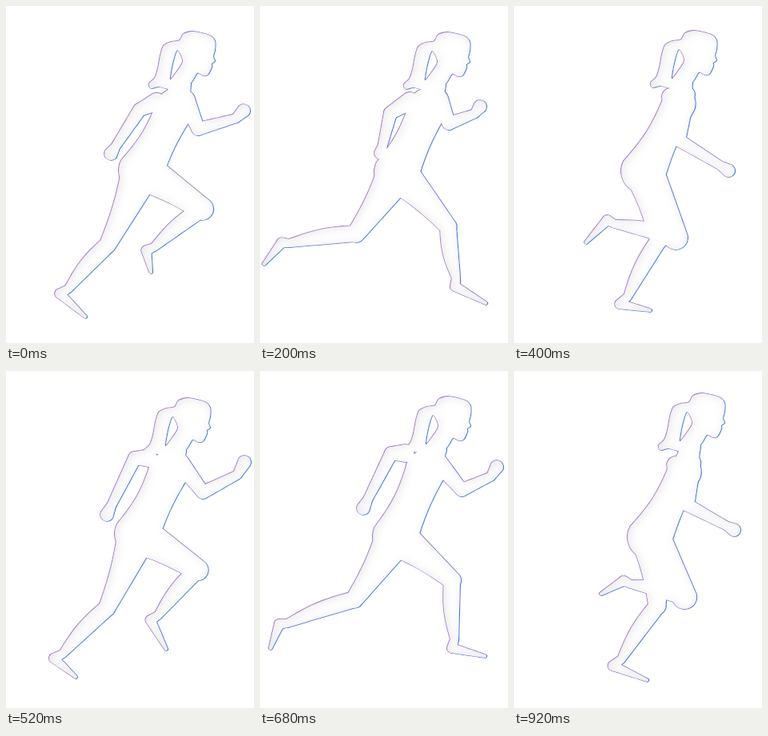
An HTML page with a canvas that plays this animation: 310 by 422 pixels, repeating every 1000 ms.

```html
<!DOCTYPE html>
<html lang="en">
<head>
<meta charset="utf-8">
<title>Runner</title>
<style>
html, body { margin: 0; width: 100%; height: 100%; overflow: hidden; background: #fff; }
canvas { display: block; }
</style>
</head>
<body>
<canvas id="stage" width="310" height="422"></canvas>
<script>
const W = 310, H = 422, LOOP = 1000;
const ctx = document.getElementById('stage').getContext('2d');
const shade = Object.assign(document.createElement('canvas'), { width: W, height: H });
const sctx = shade.getContext('2d');

// Moments at which the picture changes
const STEPS = [0, 80, 160, 200, 280, 360, 400, 480, 520, 600, 680, 720, 800, 880, 920];

const points = s => s.split(' ').map(p => p.split(',').map(Number));
const shift = (pts, dx, dy) => pts.map(([x, y]) => [x + dx, y + dy]);
const mix = (a, b, k) => Array.isArray(a) ? a.map((v, i) => mix(v, b[i], k)) : a + (b - a) * k;

// Head with ponytail, drawn once and carried along
const HEAD = points('222,35 217,43 206,45 197,50 193,62 190,78 186,90 179,97 181,103 191,101 203,104 220,104 232,95 239,84 246,87 252,86 257,76 257,72 261,69 259,63 261,55 261,44 255,37 235,32');
const HAIR_GAP = points('214,55 221,69 213,83 205,92 208,72');

// Joints: head shift, chest, hip, back elbow and hand, front elbow and hand,
// then knee, ankle and toe of each leg
const pose = (t, joints) => ({ t, joints: points(joints) });
const POSES = [
  pose(0, '0,0 211,128 169,206 167,130 131,185 240,154 297,131 127,299 78,354 99,389 245,254 185,302 181,333'),
  pose(200, '1,1 210,127 171,208 163,134 151,184 236,147 275,126 120,285 37,297 5,323 235,276 245,341 282,372'),
  pose(400, '-8,-1 206,122 162,207 196,145 185,165 206,168 268,206 202,290 126,273 90,296 181,293 142,364 170,381'),
  pose(520, '-6,2 203,126 164,204 161,109 126,180 246,152 298,114 239,249 190,306 200,348 126,297 71,354 87,383'),
  pose(680, '2,0 207,124 169,207 164,103 129,172 252,149 296,120 240,262 243,336 281,357 118,286 34,316 13,347'),
  pose(800, '5,-4 211,132 172,207 170,150 176,171 225,162 256,224 217,286 211,365 249,387 154,290 84,265 40,269'),
  pose(920, '2,-4 213,126 170,208 203,148 193,168 217,168 275,199 179,294 134,361 166,387 213,283 146,267 109,279')
];

// The landing repeats half a stride earlier with the legs exchanged
const landing = shift(POSES[5].joints, -5, 2);
POSES.splice(2, 0, { t: 300, joints: [...landing.slice(0, 7), ...landing.slice(10), ...landing.slice(7, 10)] });
POSES.push({ ...POSES[0], t: LOOP });

function jointsAt(t) {
  const i = POSES.findIndex(p => p.t > t), a = POSES[i - 1], b = POSES[i];
  return mix(a.joints, b.joints, (t - a.t) / (b.t - a.t));
}

// Unit vector from a to b
function toward(a, b) {
  const dx = b[0] - a[0], dy = b[1] - a[1], d = Math.hypot(dx, dy) || 1;
  return [dx / d, dy / d];
}

// Tapered limb with round ends; each side may swell or narrow in the middle
function bone(a, b, ra, rb, back = 0, front = 0) {
  const path = new Path2D(), n = 10;
  const [ux, uy] = toward(a, b), angle = Math.atan2(uy, ux);
  const edge = (k, sign, swell) => {
    const [x, y] = mix(a, b, k);
    const r = sign * (mix(ra, rb, k) + swell * Math.sin(Math.PI * k));
    path.lineTo(x - uy * r, y + ux * r);
  };
  for (let i = 0; i <= n; i++) edge(i / n, 1, back);
  path.arc(...b, rb, angle + Math.PI / 2, angle - Math.PI / 2, true);
  for (let i = n; i >= 0; i--) edge(i / n, -1, front);
  path.arc(...a, ra, angle - Math.PI / 2, angle - Math.PI * 1.5, true);
  path.closePath();
  return path;
}

// Adds a closed smooth curve through the points
function curve(path, pts) {
  const n = pts.length, at = i => pts[(i + n) % n];
  path.moveTo(...pts[0]);
  for (let i = 0; i < n; i++) {
    const [a, b, c, d] = [at(i - 1), at(i), at(i + 1), at(i + 2)];
    path.bezierCurveTo(
      b[0] + (c[0] - a[0]) / 7, b[1] + (c[1] - a[1]) / 7,
      c[0] - (d[0] - b[0]) / 7, c[1] - (d[1] - b[1]) / 7, ...c);
  }
  path.closePath();
}

function arm(shoulder, elbow, hand) {
  // A raised hand bends up at the wrist
  const [x, y] = mix(elbow, hand, 0.83);
  const wrist = [x, y + Math.max(0, elbow[1] - hand[1]) * 0.25];
  return [bone(shoulder, elbow, 11, 8), bone(elbow, wrist, 8, 5.5), bone(wrist, hand, 5.5, 8)];
}

function leg(hip, knee, ankle, toe) {
  const thigh = toward(hip, knee), shin = toward(knee, ankle), foot = toward(ankle, toe);
  const kneeSize = 13 - 3 * (thigh[0] * shin[0] + thigh[1] * shin[1]);
  const heel = ankle.map((v, i) => v + 13 * shin[i] - 4 * foot[i]);
  return [
    bone(hip, knee, 25, kneeSize, -3),
    bone(knee, ankle, 10, 5, 4),
    bone(ankle, heel, 5, 6),
    bone(heel, toe, 6, 2)
  ];
}

function shapesAt(t) {
  const [lean, chest, hip, elbowB, handB, elbowF, handF, ...legs] = jointsAt(t);
  const head = new Path2D();
  curve(head, shift(HEAD, ...lean));
  curve(head, shift(HAIR_GAP, ...lean));
  head.rule = 'evenodd';

  // The shoulders turn as the elbows part
  const spread = elbowF[0] - elbowB[0], chestSize = 20 + spread * 0.055;
  const neck = [219 + lean[0], 98 + lean[1]];
  const shoulderB = [chest[0] - 8 - spread * 0.2, Math.min(chest[1] - 8, elbowB[1])];
  const shoulderF = [chest[0] + 8 + spread * 0.08, chest[1] - 11];
  return [
    head,
    bone(neck, chest, 12, chestSize, -2, -2),
    bone(chest, hip, chestSize, 28, -5, -3),
    ...arm(shoulderB, elbowB, handB),
    ...arm(shoulderF, elbowF, handF),
    ...leg(hip, ...legs.slice(0, 3)),
    ...leg(hip, ...legs.slice(3))
  ];
}

function fillAll(c, shapes, color) {
  c.fillStyle = color;
  for (const s of shapes) c.fill(s, s.rule || 'nonzero');
}

function rim(shapes, color, dx, dy) {
  ctx.save();
  ctx.translate(dx, dy);
  ctx.strokeStyle = color;
  for (const s of shapes) ctx.stroke(s);
  ctx.restore();
}

// Soft tint that fades from the outline inwards
function drawShade(shapes) {
  sctx.clearRect(0, 0, W, H);
  fillAll(sctx, shapes, '#777279');
  sctx.save();
  sctx.globalCompositeOperation = 'destination-out';
  sctx.filter = 'blur(6px)';
  sctx.drawImage(shade, 2, 1);
  sctx.restore();
  ctx.globalAlpha = 0.17;
  ctx.drawImage(shade, 0, 0);
  ctx.globalAlpha = 1;
}

function draw(t) {
  const shapes = shapesAt(t);
  ctx.fillStyle = '#fff';
  ctx.fillRect(0, 0, W, H);
  ctx.lineWidth = 1.1;
  ctx.lineJoin = 'round';
  rim(shapes, '#3c7fe0', 0.6, 0.2);
  rim(shapes, '#a878c4', -0.4, -0.3);
  fillAll(ctx, shapes, '#fff');
  drawShade(shapes);
}

const start = performance.now();
let shown = -1;
function tick() {
  const now = (performance.now() - start) % LOOP;
  const step = STEPS.filter(s => s <= now).pop();
  if (step !== shown) draw(shown = step);
  requestAnimationFrame(tick);
}
tick();
</script>
</body>
</html>
```
